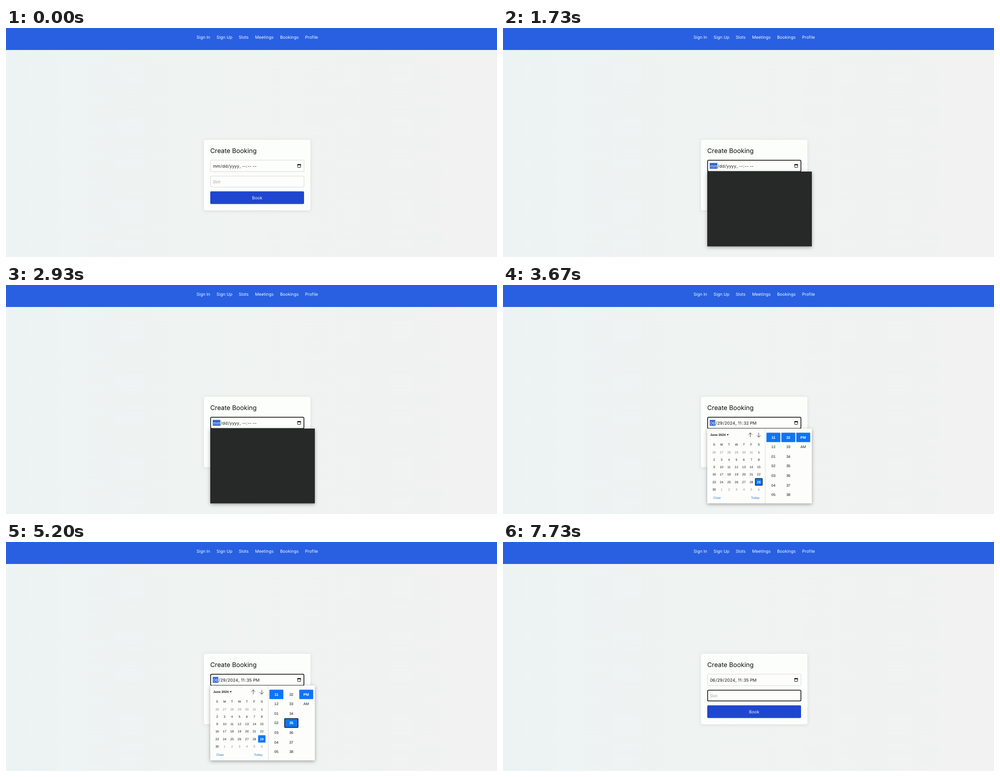
Write an HTML page with a canvas that moves like this. It is 1000 by 469 pixels and loops after 8000 ms.

```html
<!DOCTYPE html>
<html lang="en">
<head>
<meta charset="utf-8">
<title>Create Booking</title>
<style>
  html, body { margin: 0; width: 100%; height: 100%; overflow: hidden; background: #eff3f2; }
  canvas { display: block; width: 100vw; height: 100vh; }
</style>
</head>
<body>
<canvas id="stage"></canvas>
<script>
const W = 1000, H = 469, LOOP = 8000;
const UI = 'Inter, sans-serif';
const SYS = '"Liberation Sans", Arial, sans-serif';
const BLUE = '#0b75f6';
const canvas = document.getElementById('stage');
const ctx = canvas.getContext('2d');

function fit() {
  const dpr = window.devicePixelRatio || 1;
  canvas.width = Math.round(innerWidth * dpr);
  canvas.height = Math.round(innerHeight * dpr);
}
addEventListener('resize', fit);
fit();

function text(str, x, y, size, color, { font = UI, align = 'left', weight = 400 } = {}) {
  ctx.font = `${weight} ${size}px ${font}`;
  ctx.textAlign = align;
  ctx.fillStyle = color;
  ctx.fillText(str, x, y);
}

function box(x, y, w, h, r, fill, stroke, line = 1) {
  ctx.beginPath();
  ctx.roundRect(x, y, w, h, r);
  if (fill) { ctx.fillStyle = fill; ctx.fill(); }
  if (stroke) { ctx.strokeStyle = stroke; ctx.lineWidth = line; ctx.stroke(); }
}

function shadowed(blur, dy, color, draw) {
  const k = canvas.width / W;
  ctx.save();
  ctx.shadowBlur = blur * k;
  ctx.shadowOffsetY = dy * k;
  ctx.shadowColor = color;
  draw();
  ctx.restore();
}

function path(points, color, line) {
  ctx.beginPath();
  points.forEach(([x, y], i) => i ? ctx.lineTo(x, y) : ctx.moveTo(x, y));
  ctx.strokeStyle = color;
  ctx.lineWidth = line;
  ctx.stroke();
}

function page() {
  const bg = ctx.createLinearGradient(0, 0, W, 0);
  bg.addColorStop(0, '#edf3f3');
  bg.addColorStop(0.4, '#eff3f2');
  bg.addColorStop(1, '#f1f2f1');
  ctx.fillStyle = bg;
  ctx.fillRect(0, 0, W, H);
  ctx.fillStyle = '#2860e1';
  ctx.fillRect(0, 0, W, 45);
  const nav = { 'Sign In': 388, 'Sign Up': 428.8, Slots: 474, Meetings: 507.2, Bookings: 558.2, Profile: 609 };
  for (const [label, x] of Object.entries(nav)) text(label, x, 22.2, 8.66, '#f4f7fd');
}

function field(y, h, focused) {
  if (focused) box(416.7, y + 0.2, 190, h - 0.4, 2.2, '#fdfefc', '#0c0c0c', 1.5);
  else box(416.5, y, 190.5, h, 2, '#fdfefc', '#d3d6d3', 0.9);
}

const EMPTY = [['mm', 421.4], ['/', 437], ['dd', 440.6], ['/', 452], ['yyyy', 455.6], [',', 475.7],
  ['--', 480.8], [':', 488.9], ['--', 492.2], ['--', 502.6]];
const filled = min => [['06', 421.4], ['/', 432.9], ['29', 436.5], ['/', 447.8], ['2024', 451.3], [',', 473.3],
  ['11', 478.6], [':', 486.9], [min, 490], ['PM', 503]];

function calendarIcon() {
  box(594, 279.6, 6, 6, 0.5, null, '#111', 1);
  ctx.fillStyle = '#111';
  ctx.fillRect(593.6, 279, 6.9, 2.1);
  ctx.fillRect(594.6, 278.2, 1, 1);
  ctx.fillRect(598.4, 278.2, 1, 1);
}

function form(s) {
  shadowed(6, 1, 'rgba(0,0,0,.1)', () => box(403, 229, 217, 144.6, 4, '#fcfefc'));
  text('Create Booking', 416, 256.3, 12.99, '#0a0a0a');

  field(270.6, 23.5, s.focus === 'date');
  const parts = s.value ? filled(s.value) : EMPTY;
  if (s.focus === 'date') {
    ctx.fillStyle = '#2f63c9';
    ctx.fillRect(421, 276.4, s.value ? 11.4 : 15.6, 11.8);
  }
  parts.forEach(([str, x], i) =>
    text(str, x, 285.5, 8.66, s.focus === 'date' && i === 0 ? '#eef3fd' : '#151515'));
  calendarIcon();

  field(303.2, 22.6, s.focus === 'slot');
  text('Slot', 420.9, 317.7, 8.66, '#a2aaac');
  if (s.caret) {
    ctx.fillStyle = '#151515';
    ctx.fillRect(421, 309, 0.8, 10.6);
  }
  box(416, 334.5, 191, 26, 2, '#1f46d0');
  text('Book', 511.5, 350.7, 8.66, '#eef2fd', { align: 'center' });
}

function arrow(x, dir) {
  const y = 307.3, tip = y - 4.6 * dir, wing = tip + 4.2 * dir;
  path([[x, y + 4.6 * dir], [x, tip]], '#222', 0.8);
  path([[x - 4, wing], [x, tip], [x + 4, wing]], '#222', 0.8);
}

function month(s) {
  const small = (str, x, y, color, opt) => text(str, x, y, 6.49, color, { font: SYS, ...opt });
  small('June 2024', 422, 309.2, '#111', { weight: 700 });
  ctx.beginPath();
  ctx.moveTo(455.6, 305.6);
  ctx.lineTo(459.8, 305.6);
  ctx.lineTo(457.7, 308.2);
  ctx.fill();
  arrow(503.6, 1);
  arrow(520.9, -1);

  const pitch = 15.16;
  [...'SMTWTFS'].forEach((d, i) => small(d, 430 + i * pitch, 328.9, '#111', { align: 'center' }));
  for (let i = 0; i < 42; i++) {
    const n = i - 5;
    const day = n < 1 ? n + 31 : n > 30 ? n - 30 : n;
    const x = 430 + (i % 7) * pitch, y = 342.5 + Math.floor(i / 7) * pitch;
    const on = n === 29;
    if (on) {
      box(x - 7.5, y - 7.4, 15, 15, 1, BLUE);
      if (s.cell === 'day') box(x - 7, y - 6.9, 14, 14, 1, null, '#0c0c0c', 1.1);
    }
    const color = on ? '#fff' : n < 1 || n > 30 ? '#858785' : '#151515';
    small(String(day), x, y + 2.4, color, { align: 'center', weight: on ? 700 : 400 });
  }
  small('Clear', 428.3, 437.6, '#2574d8');
  small('Today', 522.4, 437.6, '#2574d8', { align: 'right' });
}

function column(cx, labels, on, hover, ring) {
  labels.forEach((label, i) => {
    const y = 312.2 + i * 19.52, hit = label === on;
    if (hit) box(cx - 14.2, y - 9.7, 28.4, 19.3, 1, BLUE);
    else if (label === hover) box(cx - 14.2, y - 9.7, 28.4, 19.3, 1, '#b5d7fd');
    if (hit && ring) box(cx - 13.6, y - 9.1, 27.2, 18.2, 1.2, null, '#0c0c0c', 1.3);
    text(label, cx, y + 2.7, 7.57, hit ? '#fff' : '#151515',
      { font: SYS, align: 'center', weight: hit ? 700 : 400 });
  });
}

function popup(s) {
  const dark = s.popup === 'dark';
  shadowed(7, 2, 'rgba(0,0,0,.35)', () => box(416, 294, 213, 153.3, 0.5, dark ? '#272928' : '#fdfefc'));
  if (dark) return;
  month(s);
  ctx.fillStyle = '#d2d4d2';
  ctx.fillRect(533.7, 294.5, 0.8, 152.5);
  const hours = Array.from({ length: 7 }, (_, i) => String((i + 10) % 12 + 1).padStart(2, '0'));
  const minutes = Array.from({ length: 7 }, (_, i) => String(32 + i));
  column(550.7, hours, '11');
  column(581.1, minutes, s.minute, s.hover, s.cell === 'minute');
  column(611.5, ['PM', 'AM'], 'PM');
}

// Each entry updates the state from its time onward.
const STEPS = [
  [0, { focus: null, value: null, popup: null, minute: '32', hover: null, cell: 'day', caret: false }],
  [1070, { focus: 'date' }],
  [1730, { popup: 'dark' }],
  [2070, { popup: 'light' }],
  [2200, { popup: null }],
  [2800, { popup: 'dark' }],
  [3065, { popup: 'light' }],
  [3670, { value: '32' }],
  [3730, { hover: '33' }],
  [4000, { hover: '35' }],
  [4270, { minute: '35', cell: 'minute', hover: null }],
  [4670, { value: '35' }],
  [5870, { popup: null }],
  [7270, { focus: 'slot', caret: true }],
  [7730, { caret: false }]
];

const stateAt = t => Object.assign({}, ...STEPS.filter(([at]) => at <= t).map(([, change]) => change));

const start = performance.now();
function frame() {
  const s = stateAt((performance.now() - start) % LOOP);
  ctx.setTransform(canvas.width / W, 0, 0, canvas.height / H, 0, 0);
  ctx.textRendering = 'geometricPrecision';
  page();
  form(s);
  if (s.popup) popup(s);
  requestAnimationFrame(frame);
}
frame();
</script>
</body>
</html>
```
